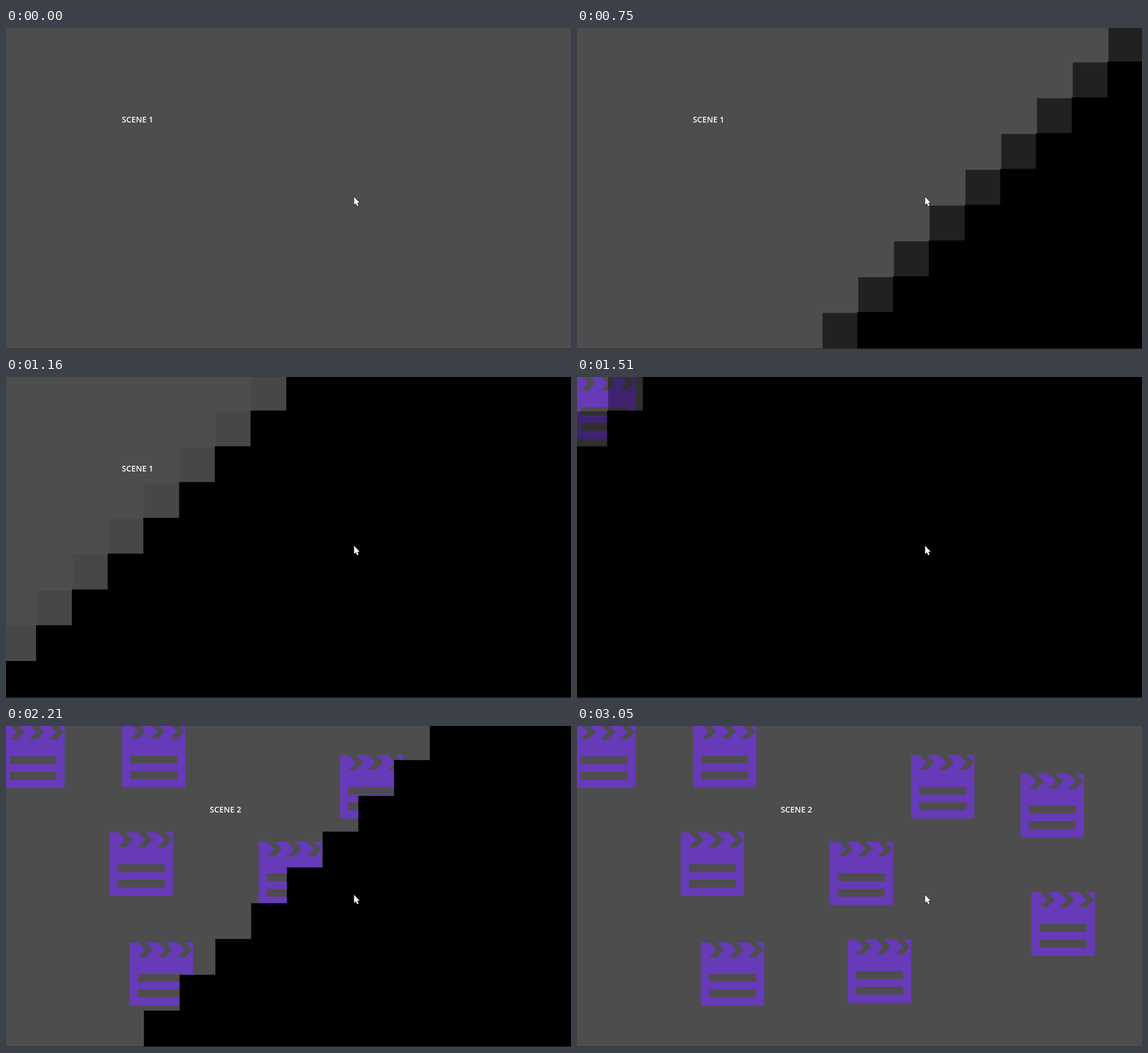
Animation, 994 px wide and 564 px high, one loop 3930 ms. Source, as an HTML page with a canvas:

```html
<!DOCTYPE html>
<html lang="en">
<head>
<meta charset="utf-8">
<title>Scene transition</title>
<style>
  html, body { margin: 0; width: 100%; height: 100%; overflow: hidden; background: #4d4d4d; }
  svg, canvas { position: absolute; left: 0; top: 0; width: 994px; height: 564px; }
  text { font: 600 14px "Open Sans", "Noto Sans", sans-serif; letter-spacing: 0.08px; fill: #fff; }
</style>
</head>
<body>
<svg viewBox="0 0 994 564">
  <defs>
    <g id="clapper">
      <path fill="#673ab7" d="M0 0H111.5V111.5H0Z"/>
      <g fill="#4d4d4d">
        <path id="chevron" d="M15 0H28L41 13L28 26H15L28 13Z"/>
        <use href="#chevron" x="34.6"/>
        <use href="#chevron" x="69.2"/>
        <path d="M14.6 56H97V69.4H14.6ZM14.6 83.1H97V96.7H14.6Z"/>
      </g>
    </g>
  </defs>
  <g id="first"><text x="203.8" y="166">SCENE 1</text></g>
  <g id="second">
    <use href="#clapper" x="-8.5" y="-2.5"/>
    <use href="#clapper" x="204.3" y="-4"/>
    <use href="#clapper" x="587.5" y="51"/>
    <use href="#clapper" x="780.2" y="84"/>
    <use href="#clapper" x="182.3" y="187"/>
    <use href="#clapper" x="444.5" y="203"/>
    <use href="#clapper" x="217.7" y="380"/>
    <use href="#clapper" x="476.5" y="375"/>
    <use href="#clapper" x="799.5" y="292"/>
    <text x="358.5" y="152">SCENE 2</text>
  </g>
</svg>
<canvas id="wipe" width="994" height="564"></canvas>
<svg viewBox="0 0 994 564">
  <path fill="#33272d" d="M0 563H994V564H0Z"/>
  <path fill="#fff" stroke="#1c1c1c" stroke-width="1.6" paint-order="stroke"
    d="M612.5 296.8V310.8L615.6 308L617.9 313L620.2 312L618 307.2L621.8 306.8Z"/>
</svg>
<script>
const LOOP = 3930, LAST = 37;
const ROWS = 9, COLS = 16, DIAGS = 24;
const CELL = 62.88, LEFT = -8.9, TOP = -3;
const SOFT = 0.6; // share of a diagonal's turn spent fading
const SWAP = 14;  // step at which the scenes change

const first = document.getElementById("first");
const second = document.getElementById("second");
const ctx = document.getElementById("wipe").getContext("2d");

const clamp = v => Math.min(1, Math.max(0, v));
const stepTime = i => 460 + 70 * i + (i > 3 && i < 12 ? 10 : 0);

// diagonals finished at a step
const covered = step => step < 0 ? 0 : 2.58 + 1.54 * step;
const revealed = step => 1.77 + 1.025 * (step - SWAP - 1);

function stepAt(t) {
  let i = -1;
  while (i < LAST && t >= stepTime(i + 1)) i++;
  return i;
}

function alphaOf(diag, step) {
  const ramp = (done, turn) => clamp((done - turn - 1 + SOFT) / SOFT);
  return step <= SWAP
    ? ramp(covered(step), DIAGS - 1 - diag)
    : 1 - ramp(revealed(step), diag);
}

function draw(step) {
  first.style.display = step < SWAP ? "" : "none";
  second.style.display = step < SWAP ? "none" : "";
  ctx.clearRect(0, 0, 994, 564);

  const alphas = Array.from({ length: DIAGS }, (_, d) => alphaOf(d, step));
  const fading = alphas.some(a => a > 0.001 && a < 0.999);
  const grow = fading ? 1 : 0;
  let solid = alphas.findIndex(a => a >= 0.999);
  if (solid < 0) solid = DIAGS;

  for (let r = 0; r < ROWS; r++) {
    const y = TOP + r * CELL;
    for (let d = r; d < Math.min(solid, r + COLS); d++) {
      if (alphas[d] <= 0.001) continue;
      const x = LEFT + (d - r) * CELL;
      ctx.fillStyle = `rgba(0,0,0,${alphas[d]})`;
      ctx.fillRect(x + 0.7, y + 0.7, CELL - 0.7, CELL - 0.7);
    }
  }
  // solid part: every row's block runs down to the bottom
  ctx.fillStyle = "#000";
  for (let r = 0; r < ROWS; r++) {
    const c = Math.max(0, solid - r);
    if (c >= COLS) continue;
    const x = LEFT + c * CELL - grow, y = TOP + r * CELL - grow;
    ctx.fillRect(x, y, 994 - x, 563 - y);
  }
}

let shown = null;
function tick() {
  const step = stepAt(performance.now() % LOOP);
  if (step !== shown) draw(shown = step);
  requestAnimationFrame(tick);
}
tick();
</script>
</body>
</html>
```
